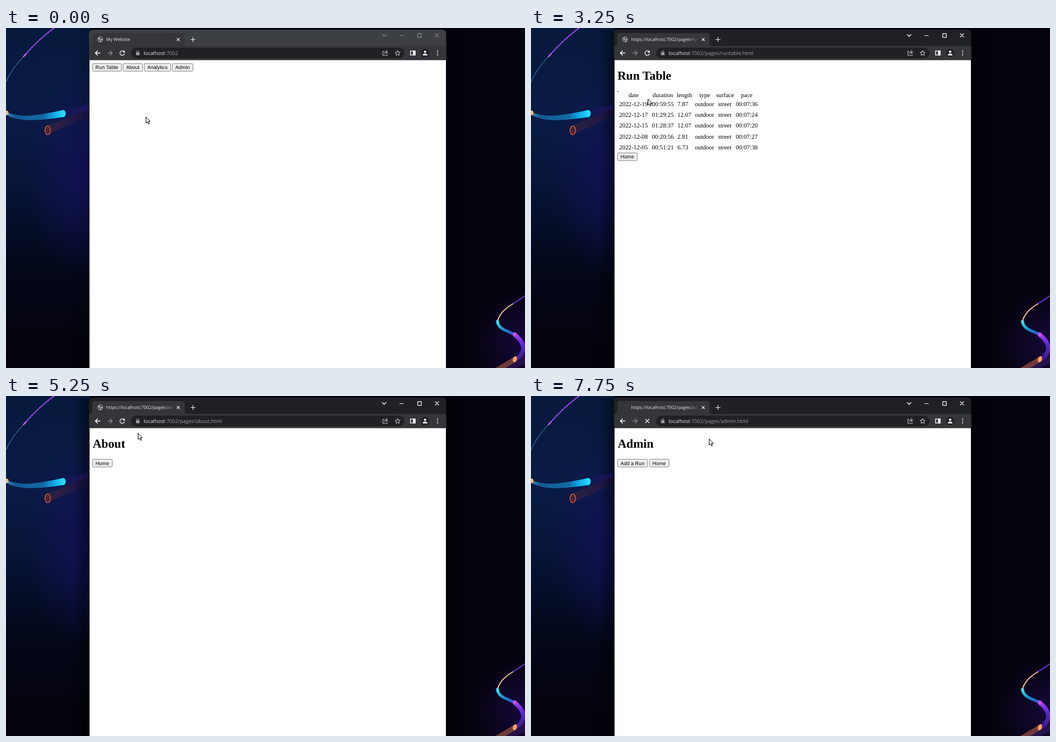
Write an HTML page that moves like this. It is 925x605 px and loops after 8 s.

```html
<!DOCTYPE html>
<html lang="en">
<head>
<meta charset="utf-8">
<title>My Website</title>
<style>
html, body { margin: 0; width: 100%; height: 100%; overflow: hidden; background: #04020c; }
svg { display: block; width: 925px; height: 605px; }
text { white-space: pre; text-rendering: geometricPrecision; }

.tab { font: 7.95px "Open Sans", sans-serif; fill: #e8eaed; }
.url { font: 9.07px "Open Sans", sans-serif; fill: #e8eaed; }
.url tspan { fill: #9aa0a6; }
.h1 { font: bold 21.75px "Liberation Serif", serif; }
.btn { font: 9.07px "Liberation Sans", sans-serif; text-anchor: middle; }
.btn rect { height: 13.6px; rx: 1.6px; fill: #efefef; stroke: #767676; stroke-width: .9; }
.table { font: 10.95px "Liberation Serif", serif; }
.head { text-anchor: middle; }
.line { fill: none; stroke: #e8eaed; stroke-width: 1.2; }
.tube { fill: none; stroke-linecap: round; }

/* One tick is 250 ms = 3.125 % */
.frame, .ctl, .shade, .show, .hot, #cursor { animation: 8s step-end infinite; }
.frame { animation-name: frame; }
.ctl { animation-name: ctl; }
.shade { animation-name: shade; }
.show { opacity: 0; }
.home { animation-name: home; }
.run { animation-name: run; }
.bare { animation-name: bare; }
.full { animation-name: full; }
.about { animation-name: about; }
.stats { animation-name: stats; }
.admin { animation-name: admin; }
.busy { animation-name: busy; }
.idle { animation-name: idle; }
.btn .hot { fill: #e5e5e5; stroke: #4f4f4f; opacity: 0; }
.h-run { animation-name: h-run; }
.h-about { animation-name: h-about; }
.h-stats { animation-name: h-stats; }
.h-admin { animation-name: h-admin; }
.h-table { animation-name: h-table; }
.h-back { animation-name: h-back; }
#cursor { animation-name: move; }

@keyframes frame { 0% { fill: #3c4043 } 6.25%, to { fill: #202124 } }
@keyframes ctl { 0% { stroke: #85888b } 6.25%, to { stroke: #fff } }
@keyframes shade { 0% { opacity: .3 } 6.25%, to { opacity: 1 } }
@keyframes home {
  0%, 56.25%, 75%, 90.625% { opacity: 1 }
  9.375%, 65.625%, 84.375%, 96.875%, to { opacity: 0 }
}
@keyframes run { 0%, 56.25%, to { opacity: 0 } 9.375% { opacity: 1 } }
@keyframes bare { 0%, 40.625%, to { opacity: 0 } 9.375% { opacity: 1 } }
@keyframes full { 0%, 56.25%, to { opacity: 0 } 40.625% { opacity: 1 } }
@keyframes about { 0%, 75%, to { opacity: 0 } 65.625% { opacity: 1 } }
@keyframes stats { 0%, 90.625%, to { opacity: 0 } 84.375% { opacity: 1 } }
@keyframes admin { 0% { opacity: 0 } 96.875%, to { opacity: 1 } }
@keyframes busy { 0%, 15.625% { opacity: 0 } 9.375%, 96.875%, to { opacity: 1 } }
@keyframes idle { 0%, 15.625% { opacity: 1 } 9.375%, 96.875%, to { opacity: 0 } }
@keyframes h-run { 0%, 9.375%, to { opacity: 0 } 6.25% { opacity: 1 } }
@keyframes h-about { 0%, 65.625%, to { opacity: 0 } 62.5% { opacity: 1 } }
@keyframes h-stats { 0%, 84.375%, to { opacity: 0 } 81.25% { opacity: 1 } }
@keyframes h-admin { 0%, 96.875%, to { opacity: 0 } 93.75% { opacity: 1 } }
@keyframes h-table { 0%, 56.25%, to { opacity: 0 } 53.125% { opacity: 1 } }
@keyframes h-back { 0%, 75%, 90.625%, to { opacity: 0 } 71.875%, 87.5% { opacity: 1 } }
@keyframes move {
  0% { transform: translate(249px, 158px) }
  3.125% { transform: translate(212px, 102px) }
  6.25% { transform: translate(188px, 67px) }
  12.5% { transform: translate(204px, 94px) }
  15.625% { transform: translate(220px, 116px) }
  18.75% { transform: translate(220px, 119px) }
  25% { transform: translate(219.5px, 120px) }
  28.125% { transform: translate(216.7px, 120px) }
  31.25% { transform: translate(213px, 120px) }
  34.375% { transform: translate(209.5px, 120.5px) }
  40.625% { transform: translate(208px, 126px) }
  43.75% { transform: translate(203px, 150px) }
  46.875% { transform: translate(192px, 188px) }
  50% { transform: translate(179px, 219px) }
  53.125% { transform: translate(173.7px, 227px) }
  59.375% { transform: translate(214px, 126px) }
  62.5% { transform: translate(235px, 66px) }
  68.75% { transform: translate(207px, 95px) }
  71.875% { transform: translate(177px, 118px) }
  75% { transform: translate(184px, 126px) }
  78.125% { transform: translate(230px, 112px) }
  81.25% { transform: translate(268px, 69px) }
  84.375% { transform: translate(262px, 75px) }
  87.5% { transform: translate(174.7px, 117.5px) }
  90.625% { transform: translate(214px, 106px) }
  93.75% { transform: translate(315px, 70px) }
  96.875%, to { transform: translate(317px, 76px) }
}
</style>
</head>
<body>
<svg viewBox="0 0 925 605">
  <defs>
    <linearGradient id="sky" x2="0" y2="1">
      <stop offset="0" stop-color="#07193c"/><stop offset=".28" stop-color="#091b45"/>
      <stop offset=".5" stop-color="#071233"/><stop offset=".72" stop-color="#030717"/>
      <stop offset="1" stop-color="#04020a"/>
    </linearGradient>
    <radialGradient id="indigo" gradientUnits="userSpaceOnUse" cx="148" cy="260" r="190" gradientTransform="translate(59) scale(.6 1)">
      <stop offset="0" stop-color="#14105c" stop-opacity=".85"/><stop offset="1" stop-color="#14105c" stop-opacity="0"/>
    </radialGradient>
    <radialGradient id="violet" gradientUnits="userSpaceOnUse" cx="925" cy="560" r="100">
      <stop offset="0" stop-color="#1c0b48" stop-opacity=".8"/><stop offset="1" stop-color="#1c0b48" stop-opacity="0"/>
    </radialGradient>
    <linearGradient id="edgeL"><stop offset="0" stop-opacity="0"/><stop offset="1" stop-opacity=".45"/></linearGradient>
    <linearGradient id="edgeR"><stop offset="0" stop-opacity=".45"/><stop offset="1" stop-opacity="0"/></linearGradient>
    <linearGradient id="cyan" gradientUnits="userSpaceOnUse" x1="0" x2="104">
      <stop offset="0" stop-color="#3f86b8"/><stop offset=".15" stop-color="#145a94"/>
      <stop offset=".65" stop-color="#136ba6"/><stop offset=".82" stop-color="#12a9e4"/><stop offset="1" stop-color="#20dcff"/>
    </linearGradient>
    <linearGradient id="dusk" gradientUnits="userSpaceOnUse" x1="104" x2="148">
      <stop offset="0" stop-color="#131750"/><stop offset="1" stop-color="#2a1a78"/>
    </linearGradient>
    <linearGradient id="rust" gradientUnits="userSpaceOnUse" x1="74" x2="148">
      <stop offset="0" stop-color="#3c2438"/><stop offset="1" stop-color="#1d154c"/>
    </linearGradient>
    <linearGradient id="teal" gradientUnits="userSpaceOnUse" x1="875" y1="520" x2="908" y2="546">
      <stop offset="0" stop-color="#2ce4f4"/><stop offset=".5" stop-color="#1687c8"/><stop offset="1" stop-color="#3d4fd0"/>
    </linearGradient>
    <linearGradient id="plum" gradientUnits="userSpaceOnUse" x1="0" y1="545" x2="0" y2="592">
      <stop offset="0" stop-color="#a440ee"/><stop offset=".4" stop-color="#5a28d8"/><stop offset="1" stop-color="#3c1a80"/>
    </linearGradient>
    <linearGradient id="fade"><stop offset="0" stop-color="#35363a" stop-opacity="0"/><stop offset="1" stop-color="#35363a"/></linearGradient>
    <clipPath id="title"><path d="M178 10h120v20h-120z"/></clipPath>
    <g id="back" class="btn">
      <rect x="154.3" y="112.6" width="35"/>
      <rect class="hot h-back" x="154.3" y="112.6" width="35"/>
      <text x="171.6" y="122.5">Home</text>
    </g>
  </defs>

  <!-- Wallpaper -->
  <path fill="#04020c" d="M0 0h925v605H0z"/>
  <path fill="url(#sky)" d="M0 0h150v605H0z"/>
  <path fill="url(#indigo)" d="M0 60h150v400H0z"/>
  <path fill="url(#violet)" d="M784 440h141v165H784z"/>

  <g class="tube">
    <path d="M-1 98Q10 72 32 50" stroke="#4d8fb8"/>
    <path d="M32 50Q58 20 87 -1" stroke="#5a2ca8" stroke-width="1.6"/>
    <path d="M32 50Q58 20 87 -1" stroke="#a24cf0" stroke-width="2.4" stroke-dasharray="1.6 3.4"/>
    <path d="M31 51l5-5" stroke="#d664f4" stroke-width="2"/>
    <path d="M108 151L150 141" stroke="url(#dusk)" stroke-width="11" opacity=".75"/>
    <path d="M76 181L150 149" stroke="url(#rust)" stroke-width="14" opacity=".7" stroke-linecap="butt"/>
  </g>
  <path fill="url(#cyan)" d="M0 149Q16 157 42 156Q72 153 101 146Q106 146 106.500 152Q106 158 102 158.500Q66 164 40 164Q14 163 0 154z"/>
  <ellipse cx="102" cy="152.300" rx="4.300" ry="6.200" fill="#26d8ff"/>
  <ellipse cx="1" cy="151" rx="3.500" ry="4" fill="#f2b878"/>
  <ellipse cx="74.300" cy="182" rx="4.800" ry="7.800" fill="#4a2430" stroke="#cc5540" stroke-width="1.500"/>

  <g class="tube">
    <path d="M926 476L903 491" stroke="#6a35e8" stroke-width="1.800"/>
    <path d="M903 491Q881 504 876 521" stroke="#f4bf90" stroke-width="2"/>
    <path d="M876 522Q877 532 888 537T906 545" stroke="url(#teal)" stroke-width="5"/>
    <path d="M926 588L878 610" stroke="#25124c" stroke-width="15"/>
    <path d="M907 546Q922 558 922 570Q921 582 908 590" stroke="url(#plum)" stroke-width="7.500"/>
    <path d="M906 590L876 608" stroke="#6e3b36" stroke-width="9"/>
  </g>
  <ellipse cx="906.500" cy="545" rx="3" ry="3.500" fill="#c850ee"/>
  <ellipse cx="876" cy="523" rx="2" ry="4" fill="#3aeaf8"/>
  <ellipse cx="907" cy="589.500" rx="3.600" ry="5.600" fill="#ffa360" transform="rotate(20 907 589.500)"/>

  <!-- Browser window -->
  <g class="shade">
    <path fill="url(#edgeL)" d="M120 3h28v602h-28z"/>
    <path fill="url(#edgeR)" d="M784 3h28v602h-28z"/>
  </g>
  <path class="frame" d="M148 605V10q0-7 7-7H777.500q7 0 7 7V605z"/>
  <path fill="#35363a" d="M149 32q4.500 0 4.500-5V15q0-6 6-6H312.500q6 0 6 6V27q0 5 5 5H784.500V57.500H148.500V32z"/>
  <path fill="#fff" d="M149 57.200H784V605H149z"/>
  <rect x="222.500" y="35" width="487.500" height="19" rx="9.500" fill="#202124"/>

  <g class="ctl line" stroke-width="1">
    <path d="M670.300 11.200l3.700 3.600 3.700-3.600M701.500 13.500h7M733.800 10.200h6.400v6.400h-6.400zM764.700 9.700l6.800 6.800m0-6.800l-6.800 6.800"/>
  </g>

  <g class="line">
    <path d="M304.500 17.800l5 5m0-5l-5 5M329 20.500h8.500M333.300 16.200v8.500"/>
    <path stroke="#fff" stroke-width="1.400" d="M168 44.500h-8.500M163.500 40.300l-4.200 4.200 4.200 4.200"/>
    <path stroke="#85878a" stroke-width="1.300" d="M180.800 44.500h8.500M185.300 40.300l4.200 4.200-4.200 4.200"/>
    <path stroke="#c4c7cb" stroke-width="1" d="M674.500 41.500h-2.800v7.300h7.800v-2.300M674 46.300q.5-3.600 4.500-3.600M677.500 40.300l3.200 2.500-3.200 2.500z"/>
    <path stroke="#d5d8dc" stroke-width="1" stroke-linejoin="round" d="M698 40l1.300 3 3.200.3-2.400 2.200.7 3.200-2.800-1.700-2.800 1.700.7-3.200-2.400-2.200 3.200-.3z"/>
    <path stroke="#fff" stroke-width="1.300" d="M721 40.800h8.300v7.400H721z"/>
  </g>
  <g fill="#fff">
    <path d="M725.500 40.500h4v8h-4z"/>
    <circle cx="747" cy="44.500" r="7.500" fill="#202124"/>
    <circle cx="747" cy="42.300" r="2.100"/>
    <path d="M742.800 48.700q0-3.200 4.200-3.200t4.200 3.200z"/>
    <circle cx="769.300" cy="41" r="1"/><circle cx="769.300" cy="44.500" r="1"/><circle cx="769.300" cy="48" r="1"/>
  </g>
  <g fill="#9aa0a6">
    <path d="M231.800 43.300h6.200v5h-6.200z"/>
    <path fill="none" stroke="#9aa0a6" d="M233.200 43.500v-1.500a1.700 1.700 0 0 1 3.400 0v1.500"/>
  </g>

  <g class="show idle">
    <circle cx="167.800" cy="20.500" r="4.900" fill="#a3a7ab"/>
    <path fill="#35363a" d="M164 19.500l2.600 1.500 1 1.500-.8 2q-2.700-1.200-2.800-5zM167 16.800l2.600.3 1.500 1.600-1.600 1.200-2.300-.8zM169.600 21.600l2-.4q-.4 2-2.200 2.800z"/>
    <path class="line" stroke="#fff" style="stroke-width:1.400" d="M210.600 42a4.100 4.100 0 1 0 .7 3.700"/>
    <path fill="#fff" d="M211.700 39.800v4h-4z"/>
  </g>
  <g class="show busy">
    <path class="line" style="stroke:#777b80;stroke-width:1" d="M168.500 16.400q1.400 0 2.300.6"/>
    <path class="line" style="stroke-width:1.400" d="M203.600 40.900l7.200 7.200m0-7.200l-7.200 7.200"/>
  </g>

  <!-- Pages -->
  <g class="show home">
    <text class="tab" x="178.500" y="23.400">My Website</text>
    <text class="url" x="245.500" y="47.800">localhost<tspan>:7002</tspan></text>
    <g class="btn">
      <rect x="154.300" y="63.300" width="51.500"/><rect class="hot h-run" x="154.300" y="63.300" width="51.500"/>
      <text x="179.700" y="73.200">Run Table</text>
      <rect x="208.700" y="63.300" width="34.700"/><rect class="hot h-about" x="208.700" y="63.300" width="34.700"/>
      <text x="226" y="73.200">About</text>
      <rect x="246.500" y="63.300" width="47"/><rect class="hot h-stats" x="246.500" y="63.300" width="47"/>
      <text x="269.800" y="73.200">Analytics</text>
      <rect x="296.500" y="63.300" width="36.500"/><rect class="hot h-admin" x="296.500" y="63.300" width="36.500"/>
      <text x="314.700" y="73.200">Admin</text>
    </g>
  </g>

  <g class="show run">
    <text class="tab" x="178.500" y="23.400" clip-path="url(#title)">https://localhost:7002/pages/runtable.html</text>
    <text class="url" x="245.500" y="47.800">localhost<tspan>:7002/pages/runtable.html</tspan></text>
    <text class="h1" x="153.900" y="92">Run Table</text>
  </g>
  <use class="show bare" href="#back"/>
  <g class="show full">
    <path d="M154 112.300h1.400v1.400H154z"/>
    <g class="table">
      <text class="head" y="123.300"><tspan x="183">date</tspan><tspan x="235">duration</tspan><tspan x="273.300">length</tspan><tspan x="309.700">type</tspan><tspan x="346">surface</tspan><tspan x="384.600">pace</tspan></text>
      <text y="139"><tspan x="157.200">2022-12-19</tspan><tspan x="215.500">00:59:55</tspan><tspan x="261">7.87</tspan><tspan x="292.300">outdoor</tspan><tspan x="333.500">street</tspan><tspan x="365">00:07:36</tspan></text>
      <text y="158.200"><tspan x="157.200">2022-12-17</tspan><tspan x="215.500">01:29:25</tspan><tspan x="261">12.07</tspan><tspan x="292.300">outdoor</tspan><tspan x="333.500">street</tspan><tspan x="365">00:07:24</tspan></text>
      <text y="177.400"><tspan x="157.200">2022-12-15</tspan><tspan x="215.500">01:28:37</tspan><tspan x="261">12.07</tspan><tspan x="292.300">outdoor</tspan><tspan x="333.500">street</tspan><tspan x="365">00:07:20</tspan></text>
      <text y="196.600"><tspan x="157.200">2022-12-08</tspan><tspan x="215.500">00:20:56</tspan><tspan x="261">2.81</tspan><tspan x="292.300">outdoor</tspan><tspan x="333.500">street</tspan><tspan x="365">00:07:27</tspan></text>
      <text y="215.800"><tspan x="157.200">2022-12-05</tspan><tspan x="215.500">00:51:21</tspan><tspan x="261">6.73</tspan><tspan x="292.300">outdoor</tspan><tspan x="333.500">street</tspan><tspan x="365">00:07:38</tspan></text>
    </g>
    <g class="btn">
      <rect x="154.300" y="222.200" width="35"/><rect class="hot h-table" x="154.300" y="222.200" width="35"/>
      <text x="171.600" y="232.100">Home</text>
    </g>
  </g>

  <g class="show about">
    <text class="tab" x="178.500" y="23.400" clip-path="url(#title)">https://localhost:7002/pages/about.html</text>
    <text class="url" x="245.500" y="47.800">localhost<tspan>:7002/pages/about.html</tspan></text>
    <text class="h1" x="154.400" y="92">About</text>
    <use href="#back"/>
  </g>

  <g class="show stats">
    <text class="tab" x="178.500" y="23.400" clip-path="url(#title)">https://localhost:7002/pages/analytics.html</text>
    <text class="url" x="245.500" y="47.800">localhost<tspan>:7002/pages/analytics.html</tspan></text>
    <text class="h1" x="154.400" y="92">Analytics</text>
    <use href="#back"/>
  </g>

  <g class="show admin">
    <text class="tab" x="178.500" y="23.400" clip-path="url(#title)">https://localhost:7002/pages/admin.html</text>
    <text class="url" x="245.500" y="47.800">localhost<tspan>:7002/pages/admin.html</tspan></text>
    <text class="h1" x="154.400" y="92">Admin</text>
    <g class="btn">
      <rect x="154.300" y="112.600" width="53.300"/><text x="180.800" y="122.500">Add a Run</text>
      <rect x="211" y="112.600" width="35"/><text x="228.300" y="122.500">Home</text>
    </g>
  </g>
  <path fill="url(#fade)" d="M282 12h17v17h-17z"/>

  <g id="cursor">
    <path fill="#fff" stroke="#000" stroke-width="1" stroke-linejoin="round" d="M.5 .5V11.200L3 8.900L4.700 12.900L6.500 12.100L4.800 8.200H8z"/>
  </g>
</svg>
</body>
</html>
```
